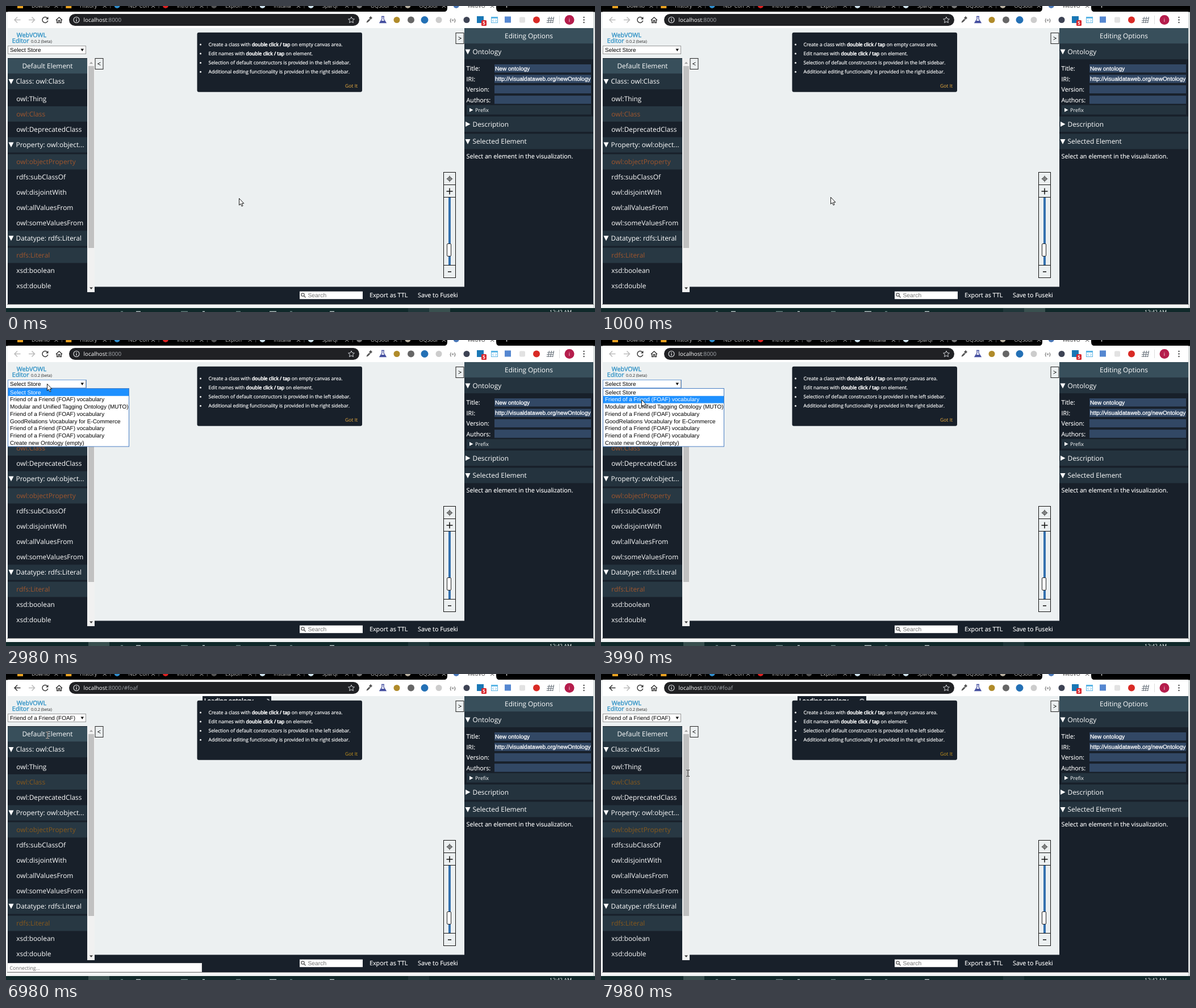
These frames come from a looping animation (1037x540 px, 8000 ms). An HTML page:

```html
<!DOCTYPE html>
<html lang="en">
<head>
<meta charset="utf-8">
<title>Ontology editor</title>
<style>
html, body { margin: 0; width: 100%; height: 100%; overflow: hidden; background: #f4f6f6; }
svg { display: block; width: 100vw; height: 100vh; }
text { font-family: "Open Sans", sans-serif; fill: #fff; white-space: pre; text-rendering: geometricPrecision; }
.big { font-size: 11.9px; }
.mid { font-size: 10.75px; stroke: #fff; stroke-width: .15px; }
.hint { font-size: 8.59px; stroke: #fff; stroke-width: .2px; }
.thick { stroke: #fff; stroke-width: .55px; }
.url { font-size: 9.9px; fill: #a0a4a9; }
.tab { font-size: 9px; }
.ui { font-family: "Liberation Sans", Arial, sans-serif; font-size: 10px; fill: #000; }
.field { font-size: 10.1px; fill: #fff; stroke: #fff; stroke-width: .3px; }
.logo { fill: #3293c6; stroke: #3293c6; stroke-width: .4px; }
.c { text-anchor: middle; }
.line { fill: none; stroke: #333; stroke-width: 1.4px; }

.pick, .got, .early, .late, .menu, .bar, .row0, .row1, .status, .arrow, .beam, .lit, .spin {
  animation: 8s step-end infinite;
}
.pick { fill: #a0562d; animation-name: pick; }
.got { fill: #f0b040; stroke: none; animation-name: got; }
.early { animation-name: early; }
.late { animation-name: late; }
.menu { animation-name: menu; }
.bar { animation-name: bar; }
.row0 { animation-name: row0; }
.row1 { animation-name: row1; }
.status { animation-name: status; }
.arrow { animation-name: arrow; }
.beam { animation-name: beam; mix-blend-mode: difference; }
.lit { animation-name: lit; }
.spin { animation-name: spin; }

@keyframes pick { 87.25%, 100% { fill: #87591c; } }
@keyframes got { 87.25%, 100% { fill: #cb971c; } }
@keyframes early { 0% { opacity: 1; } 87.25%, 100% { opacity: 0; } }
@keyframes late { 0% { opacity: 0; } 87.25%, 100% { opacity: 1; } }
@keyframes menu { 0% { opacity: 0; } 37.25% { opacity: 1; } 87.25%, 100% { opacity: 0; } }
@keyframes bar { 0% { transform: none; } 49.875%, 100% { transform: translateY(12.75px); } }
@keyframes row0 { 0% { fill: #fff; } 49.875%, 100% { fill: #000; } }
@keyframes row1 { 0% { fill: #000; } 49.875%, 100% { fill: #fff; } }
@keyframes status { 0% { opacity: 0; } 87.25% { opacity: 1; } 99.75%, 100% { opacity: 0; } }
@keyframes lit { 0% { transform: translateX(745px); } 37.25%, 100% { transform: translateX(145px); } }
@keyframes spin { 0% { transform: rotate(60deg); } 99.75%, 100% { transform: rotate(0deg); } }
@keyframes arrow {
  0% { opacity: 1; transform: translate(410px, 339px); }
  12.5% { opacity: 1; transform: translate(404px, 337px); }
  24.75% { opacity: 0; transform: translate(404px, 337px); }
  37.25% { opacity: 1; transform: translate(72px, 77px); }
  49.875% { opacity: 1; transform: translate(71px, 105px); }
  74.875% { opacity: 1; transform: translate(72px, 106px); }
  87.25%, 100% { opacity: 0; transform: translate(72px, 106px); }
}
@keyframes beam {
  0% { opacity: 0; transform: translate(81px, 106px); }
  24.75% { opacity: 1; transform: translate(81px, 106px); }
  37.25% { opacity: 0; transform: translate(81px, 106px); }
  87.25% { opacity: 1; transform: translate(73px, 108px); }
  99.75%, 100% { opacity: 1; transform: translate(153px, 175px); }
}
</style>
</head>
<body>
<svg id="stage" viewBox="0 0 1037 540"></svg>
<script>
const DARK = '#18202a', HEAD = '#384f5b', ROW = '#24333e', PALE = '#ecf0f1';

const rect = (x, y, w, h, fill, more = '') =>
  `<rect x="${x}" y="${y}" width="${w}" height="${h}" fill="${fill}" ${more}/>`;
const box = (x, y, w, h, fill, stroke) =>
  rect(x + .5, y + .5, w - 1, h - 1, fill, `stroke="${stroke}"`);
const dot = (x, y, r, fill, more = '') => `<circle cx="${x}" cy="${y}" r="${r}" fill="${fill}" ${more}/>`;
const path = (d, more = 'class="line"') => `<path d="${d}" ${more}/>`;
const text = (x, y, s, cls) => `<text x="${x}" y="${y}" class="${cls}">${s}</text>`;
const group = (cls, ...parts) => `<g class="${cls}">${parts.join('')}</g>`;
const fold = (x, y, open) => path(
  open ? `M${x - .5} ${y - 4}h9l-4.5 9z` : `M${x} ${y - 4.5}v9l8.5-4.5z`, 'fill="#fff"');

function tabs() {
  const names = ['Downlo', 'History', 'NLP Con', 'Intro to', 'Explori', 'Installa',
    'Sparql', 'OQSour', 'OQSour', 'WebVO'];
  const tints = ['#e8a020', '#e8a020', '#2f8fd0', '#e02020', '#555', '#cfe3ee',
    '#cfe3ee', '#777', '#b8b0a0', '#4a78b8'];
  let out = rect(0, 0, 1037, 10.5, '#000') +
    path('M770 10.5q7 0 7-7V0h86v3.5q0 7 7 7z', 'fill="#fff"');
  names.forEach((name, i) => {
    const x = 25 + i * 85.3, ink = i === 9 ? '#333' : '#c8c8c8';
    out += i < 2 ? rect(x - 5, -5, 10, 9, tints[i]) : dot(x, -1, 5, tints[i]);
    out += `<text x="${x + 20}" y="3" class="tab" style="fill:${ink}">${name}</text>`;
    out += path(`M${x + 60.5}-3l6 6m0-6l-6 6`, `stroke="${ink}" fill="none"`);
    if (i < 8) out += rect(x + 73, 0, 1, 4, '#555');
  });
  return out + path('M877.5-1h8M881.5-5v8', 'stroke="#bbb" stroke-width="1.5"');
}

function backArrow(ink) {
  return path('M25.5 24.5H15.5M20 19.5l-5 5 5 5', `fill="none" stroke="${ink}" stroke-width="1.5"`);
}

function toolbar() {
  return [
    rect(3, 10, 1031, 29, '#fff'),
    group('early', backArrow('#bbb')), group('late', backArrow('#333')),
    path('M40 24.5H50M45.5 19.5l5 5-5 5', 'fill="none" stroke="#bbb" stroke-width="1.5"'),
    path('M73 21.5a5 5 0 1 0 .8 4.2'), path('M74.5 19v4.5H70z', 'fill="#333"'),
    path('M88 25l5.5-5 5.5 5M89.7 24v5.5h2.7v-4h2.2v4h2.7V24'),
    rect(111, 14, 511, 21, '#202124', 'rx="10.5"'),
    dot(124, 24.5, 5, 'none', 'stroke="#e8eaed" stroke-width="1.1"'),
    rect(123.4, 23.7, 1.3, 3.8, '#e8eaed'), rect(123.4, 21.5, 1.3, 1.3, '#e8eaed'),
    text(136.5, 28, '<tspan fill="#fff">localhost</tspan>:8000', 'url'),
    group('late', text(204, 28, '/#foaf', 'url')),
    path('M608 19.2l1.6 3.5 3.8.4-2.8 2.6.8 3.8-3.4-1.9-3.4 1.9.8-3.8-2.8-2.6 3.8-.4z',
      'fill="none" stroke="#d5d8dc"'),
    path('M634.5 29.5l1-3 4-4 2 2-4 4zM639 21l3-3 3 3-3 3z', 'fill="#555"'),
    path('M661 18.5h5M662 19v4l-4 6.5h11l-4-6.5v-4', 'fill="none" stroke="#4650a0" stroke-width="1.3"'),
    path('M660 26h7l2 3.5h-11z', 'fill="#4650a0"'),
    dot(688, 24.5, 5.5, '#b08b2a'), dot(713, 24.5, 6, '#666'),
    dot(737, 24.5, 6.5, '#2370b5'), dot(762, 24.5, 5.5, '#ccc'),
    '<text x="786.5" y="27.5" class="c" style="font-size:8px;fill:#222">{=}</text>',
    dot(811, 24.5, 5.5, '#3d4354'),
    rect(829, 18, 12, 12, '#1977b5'), rect(837, 25, 9, 10, '#d8262c', 'rx="1.5"'),
    '<text x="841.5" y="33" class="c" style="font-size:8px;font-weight:700">5</text>',
    box(854, 19, 12, 11, '#fff', '#5bb5e5'), rect(854, 19, 12, 3, '#5bb5e5'),
    path('M858.5 24l-2 2 2 2m3-4l2 2-2 2', 'fill="none" stroke="#5bb5e5"'),
    rect(878, 18.5, 11, 11, '#5587d0'), rect(904, 19.5, 10, 10, '#e2e2e2', 'rx="2"'),
    dot(934, 24.5, 6, '#d92a25'),
    path('M953 22h12M952 25.5h12M951.5 29h12M956.5 19l-2 11M960.5 19l-2 11M964.5 19l-2 11',
      'fill="none" stroke="#68717a" stroke-width="1.1"'),
    rect(974, 17, 1, 15, '#ddd'), dot(992, 24.5, 8.5, '#b51d4c'),
    '<text x="992" y="28" class="c" style="font-size:9px">i</text>',
    ...[20, 24.5, 29].map(y => dot(1017.5, y, 1.2, '#444'))
  ].join('');
}

function leftPanel() {
  const heads = [[133, 'Class: owl:Class'], [244.5, 'Property: owl:object...'], [409.5, 'Datatype: rdfs:Literal']];
  const items = [
    [163.5, 'owl:Thing'], [190.5, 'owl:Class', 1], [217.5, 'owl:DeprecatedClass'],
    [275, 'owl:objectProperty', 1], [302, 'rdfs:subClassOf'], [328.8, 'owl:disjointWith'],
    [355.8, 'owl:allValuesFrom'], [382.6, 'owl:someValuesFrom'],
    [440, 'rdfs:Literal', 1], [467, 'xsd:boolean'], [493.7, 'xsd:double']
  ];
  return [
    text(18.7, 54.5, 'WebVOWL', 'mid logo'), text(10.7, 65, 'Editor', 'mid logo'),
    '<text x="44" y="65" style="font-size:7.1px;fill:#222">0.0.2 (beta)</text>',
    '<text x="33" y="74" style="font-size:6px;fill:#3293c6">visualization</text>',
    rect(3, 92, 140, 434, DARK), rect(3, 93, 140, 26.5, HEAD),
    text(73, 110.2, 'Default Element', 'big c'),
    ...heads.map(([y, s]) => rect(3, y - 13, 140, 27, ROW) + fold(5, y, true) + text(17.5, y + 4, s, 'big')),
    ...items.map(([y, s, on]) => (on ? rect(3, y - 13.5, 140, 27, '#283843') : '') +
      text(18.3, y + 4.2, s, on ? 'big pick' : 'big')),
    rect(143, 93, 13, 412, '#f1f1f1'), rect(145, 106, 10, 321, '#c1c1c1'),
    path('M147 102h6l-3-3.5z', 'fill="#a3a3a3"'), path('M147 496.5h6l-3 3.5z', 'fill="#333"'),
    box(156.5, 92, 15, 20, PALE, '#222'),
    path('M166.5 99.5l-5 2.5 5 2.5', 'fill="none" stroke="#222"')
  ].join('');
}

function rightPanel() {
  const fields = [['Title:', 'New ontology'], ['IRI:', 'http://visualdataweb.org/newOntology'],
    ['Version:', ''], ['Authors:', '']];
  const head = (y, s, open) => rect(807, y - 13.5, 227, 27, ROW) + fold(809, y, open) + text(821.5, y + 4.2, s, 'big');
  return [
    rect(807, 39, 227, 487, DARK), rect(807, 39, 227, 27.5, HEAD),
    text(920.5, 57, 'Editing Options', 'big c'),
    head(80.5, 'Ontology', true),
    '<clipPath id="edge"><rect x="807" y="95" width="223" height="85"/></clipPath><g clip-path="url(#edge)">',
    ...fields.map(([label, value], i) => {
      const y = 110.2 + i * 18.4;
      return text(810.5, y + 4.2, label, 'mid') + rect(860, y - 7.2, 170, 14.4, '#324865') +
        text(861, y + 3.7, value, 'ui field');
    }),
    '</g>',
    rect(811, 175, 219, 16.5, ROW), path('M816 180v7l6.5-3.5z', 'fill="#fff"'),
    '<text x="826" y="186.7" style="font-size:9px">Prefix</text>',
    head(208.5, 'Description', false), head(239, 'Selected Element', true),
    text(810.5, 269.3, 'Select an element in the visualization.', 'mid'),
    box(791.5, 47, 15, 20, PALE, '#222'),
    path('M796.5 54.5l5 2.5-5 2.5', 'fill="none" stroke="#222"')
  ].join('');
}

function zoomBox() {
  return [
    box(770, 293, 22, 23, PALE, '#111'), box(770, 315, 22, 23, PALE, '#111'),
    box(770, 337, 22, 121, PALE, '#111'), box(770, 457, 22, 23, PALE, '#111'),
    dot(781, 305, 3.2, 'none', 'stroke="#222"'),
    path('M775.5 305h11M781 299.5v11', 'stroke="#222" stroke-width=".9"'),
    path('M775.5 327h11M781 321.5v11M778 469h6', 'stroke="#111" stroke-width="1.5"'),
    rect(779, 338, 4, 119, '#3571ae'),
    rect(776.5, 419.5, 7, 22, '#fff', 'rx="1.5" stroke="#222"')
  ].join('');
}

function hints() {
  const bold = '<tspan class="thick">double click / tap</tspan>';
  const lines = [`Create a class with ${bold} on empty canvas area.`, `Edit names with ${bold} on element.`,
    'Selection of default constructors is provided in the left sidebar.',
    'Additional editing functionality is provided in the right sidebar.'];
  return rect(336.5, 46.7, 290.5, 105, DARK, 'rx="3"') +
    lines.map((s, i) => dot(342.5, 68 + i * 16.1, 1.5, '#fff') + text(356.5, 70.6 + i * 16.1, s, 'hint')).join('') +
    text(597, 143.6, 'Got It', 'hint got');
}

function loading() {
  return group('late', rect(346, 39, 121, 20, DARK), text(349, 51.3, 'Loading ontology', 'mid thick'),
    `<g transform="translate(459.5 48.5)">${path('M-3.5-2A4 4 0 0 1 3.5-2',
      'class="spin" fill="none" stroke="#fff" stroke-width="1.2"')}</g>`);
}

function bottomBar() {
  return [
    rect(143, 495.5, 664, 30.5, DARK),
    rect(517, 503.7, 111, 13.5, '#fff'), dot(522.5, 509.5, 2.7, 'none', 'stroke="#555" stroke-width="1.2"'),
    path('M524.5 511.5l3 3', 'stroke="#555" stroke-width="1.4"'),
    '<text x="531.5" y="514" class="ui" style="font-size:10.3px;fill:#757575">Search</text>',
    text(640, 514.2, 'Export as TTL', 'mid'), text(725, 514.2, 'Save to Fuseki', 'mid')
  ].join('');
}

function statusBar() {
  return group('status', box(2, 510, 343, 16, '#fff', '#ddd'),
    '<text x="6.5" y="521.5" style="font-size:8.75px;fill:#666">Connecting...</text>');
}

function taskbar() {
  return rect(0, 533, 1037, 7, '#10292a') + rect(708, 533, 37, 7, '#20373a') +
    group('lit', rect(0, 533, 37, 7, '#39504f')) +
    [204, 232, 312, 348, 408, 468, 502, 573].map((x, i) =>
      rect(x - (i % 3 + 2), 538.5, i % 3 * 4 + 4, 1.5, i % 2 ? '#a9b8b8' : '#5f7a78')).join('') +
    '<text x="957" y="543" style="font-size:9px">12:42 AM</text>';
}

function select() {
  const foaf = 'Friend of a Friend (FOAF) vocabulary';
  const rows = ['Select Store', foaf, 'Modular and Unified Tagging Ontology (MUTO)', foaf,
    'GoodRelations Vocabulary for E-Commerce', foaf, foaf, 'Create new Ontology (empty)'];
  return [
    box(3, 70, 138, 15, '#fff', '#999'),
    group('early', text(7, 81.3, 'Select Store', 'ui')),
    group('late', text(7, 81.3, 'Friend of a Friend (FOAF)', 'ui')),
    path('M131.5 75.5h5.5l-2.75 4.5z', 'fill="#111"'),
    group('menu', box(3, 70, 139, 15, 'none', '#6f9fd8'),
      box(3, 85, 214, 103.5, '#fff', '#4a7fc4'),
      rect(4, 86, 212, 12.75, '#1e90ff', 'class="bar"'),
      ...rows.map((s, i) => text(7, 95.6 + i * 12.75, s, `ui row${i}`)))
  ].join('');
}

function cursors() {
  return group('arrow', path('M.5.5V12.5L3.2 10 5 14.4 7 13.6 5.2 9.3H8.8Z',
      'fill="#fff" stroke="#000" stroke-width=".9"')) +
    group('beam', path('M-3-5.5H-.8L0-5 .8-5.5H3M0-5V5M-3 5.5H-.8L0 5 .8 5.5H3',
      'fill="none" stroke="#fff"'));
}

document.getElementById('stage').innerHTML = [
  rect(0, 0, 1037, 540, '#f4f6f6'), rect(1034, 10, 3, 523, '#d8dcdc'),
  tabs(), toolbar(), rect(3, 39, 1031, 487, PALE),
  bottomBar(), leftPanel(), rightPanel(), zoomBox(), loading(), hints(), select(),
  rect(2, 526, 1033, 1, '#777'), statusBar(), taskbar(), cursors()
].join('');
</script>
</body>
</html>
```
